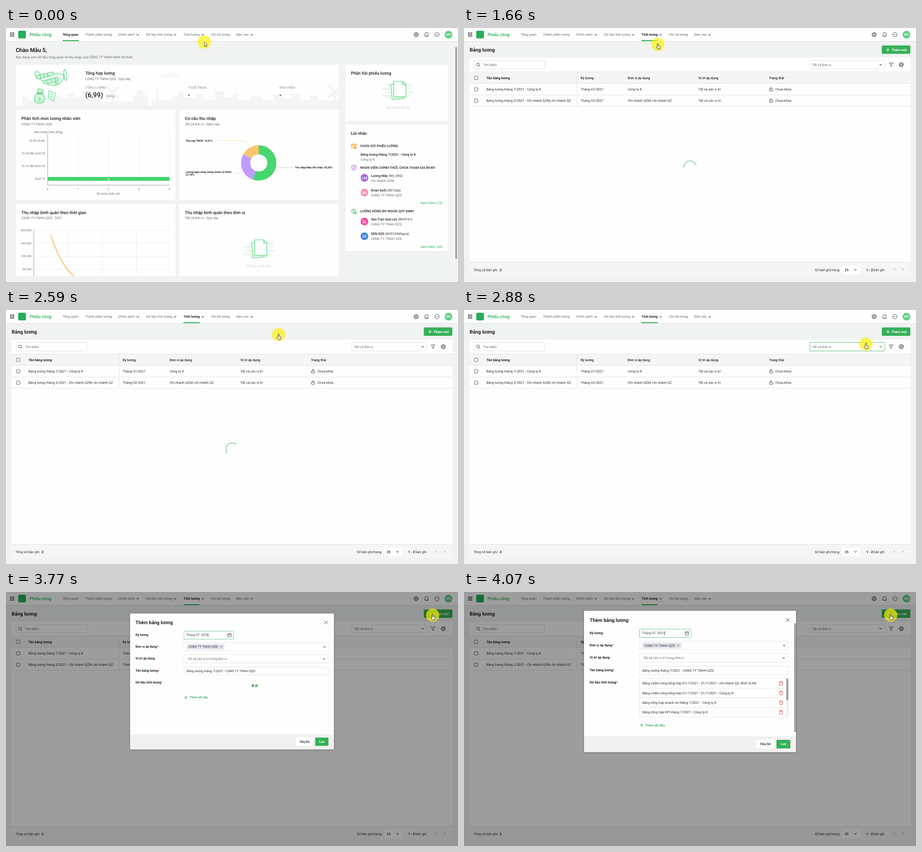
An HTML page that plays this animation: 998x561 px, repeating every 4.11 s.

```html
<!DOCTYPE html>
<html lang="vi">
<head>
<meta charset="utf-8">
<title>Bảng lương</title>
<style>
html, body { margin: 0; width: 100%; height: 100%; overflow: hidden; background: #f1f2f2; }
svg { display: block; }
text { font: 7.4px Roboto, sans-serif; fill: #2f2f2f; text-rendering: geometricPrecision; white-space: pre; }
.b { font-weight: 500; fill: #1f1f1f; }
.B { font-weight: 700; fill: #1f1f1f; }
.h { font-size: 9.42px; font-weight: 500; fill: #1f1f1f; }
.t { font-size: 10.85px; font-weight: 700; fill: #1f1f1f; }
.g { fill: #686b70; }
.l { fill: #8b8e92; }
.n { font-size: 15px; font-weight: 500; fill: #1f1f1f; }
.s { font-size: 6.4px; fill: #666; }
.d { font-size: 5.75px; font-weight: 700; fill: #1f1f1f; }
.i { font-style: italic; }
.e { text-anchor: end; }
.m { text-anchor: middle; }
.w { fill: #fff; }
.k { fill: #2fae57; font-weight: 500; }
.r { fill: #e5484d; }
.o { fill: none; stroke: #444; stroke-width: 1; }
.card { fill: #fefefe; }
.box { fill: #fefefe; stroke: #dedede; stroke-width: .8; }
.shade { filter: drop-shadow(0 1px 2px rgba(0, 0, 0, .3)); }
.grn { stroke: #3dcf6c; fill: none; stroke-width: 1.1; stroke-linejoin: round; }
.a { animation: 4110ms infinite step-end; }
.nav1 { animation-name: until1660; }
.page2 { animation-name: from1660; }
.status { animation-name: status; }
.spin { animation-name: spinShow; }
.turn { animation: turn 4110ms linear infinite; transform-origin: 499px 307px; }
.tab { animation-name: tab; }
.menu { animation: menu 4110ms linear infinite; }
.item { animation-name: item; }
.sel { animation-name: sel; }
.btn { animation-name: btn; }
.modal { animation-name: from3770; }
.grow { animation: grow 4110ms ease-out infinite; transform-origin: 499px 197.5px; }
.dots { animation-name: dots; }
.list { animation-name: list; }
.col { animation-name: col; }
.wide { animation-name: wide; width: 328.5px; }
.tip { animation-name: tip; }
.mouse { animation: mouse 4110ms linear infinite; }
.arrow { animation-name: arrow; }
.hand { animation-name: hand; }
@keyframes until1660 { 0% { opacity: 1 } 40.38% { opacity: 0 } 100% { opacity: 0 } }
@keyframes from1660 { 0% { opacity: 0 } 40.38% { opacity: 1 } }
@keyframes status { 0% { opacity: 0 } 33.32% { opacity: 1 } 40.38% { opacity: 0 } 100% { opacity: 0 } }
@keyframes spinShow { 0% { opacity: 1 } 66.66% { opacity: 0 } 100% { opacity: 0 } }
@keyframes turn { from { transform: rotate(-763.8deg) } to { transform: rotate(676.2deg) } }
@keyframes tab { 0% { fill: #686b70 } 2.6% { fill: #333 } }
@keyframes menu { 0%, 13.5% { opacity: 0 } 18%, 40.37% { opacity: 1 } 40.38%, 100% { opacity: 0 } }
@keyframes item { 0% { opacity: 0 } 25.2% { opacity: 1 } }
@keyframes sel { 0% { stroke: #dedede } 67.39% { stroke: #35b057 } 73.8% { stroke: #dedede } 100% { stroke: #dedede } }
@keyframes btn { 0% { fill: #35b057 } 76.5% { fill: #2fa551 } 82.72% { fill: #14903f } 91.72% { fill: #35b057 } }
@keyframes from3770 { 0% { opacity: 0 } 91.72% { opacity: 1 } }
@keyframes grow { 0%, 93.66% { transform: scale(.9615) } 97%, 100% { transform: none } }
@keyframes dots { 0% { opacity: 1 } 97.5% { opacity: 0 } 100% { opacity: 0 } }
@keyframes list { 0% { opacity: 0 } 97.5% { opacity: 1 } }
/* fields are wider until the dialog's scrollbar appears */
@keyframes col { 0% { transform: translateX(1px) } 97.5% { transform: none } }
@keyframes wide { 0% { width: 332px } 97.5% { width: 328.5px } }
@keyframes tip { 0% { transform: translateX(3.5px) } 97.5% { transform: none } }
@keyframes mouse {
  0% { transform: translate(438px, 31px) }
  4.38%, 20.5% { transform: translate(427px, 14.5px) }
  23.36% { transform: translate(427.5px, 22px) }
  27%, 54% { transform: translate(428px, 36px) }
  60% { transform: translate(480px, 43px) }
  66.67% { transform: translate(747px, 68px) }
  70.07% { transform: translate(887px, 75px) }
  73% { transform: translate(916px, 73px) }
  76.5% { transform: translate(935px, 58px) }
  79.08%, 100% { transform: translate(942px, 51px) }
}
@keyframes arrow { 0% { opacity: 1 } 25.2% { opacity: 0 } 100% { opacity: 0 } }
@keyframes hand { 0% { opacity: 0 } 25.2% { opacity: 1 } }
</style>
</head>
<body>
<svg width="998" height="561" viewBox="0 0 998 561">
<defs>
  <path id="chev" class="o" d="M-2.5-1.3 0 1.3 2.5-1.3" style="stroke-width:1.1"/>
  <g id="gear" class="o"><circle r="3.8"/><circle r="4.7" stroke-width="1.4" stroke-dasharray="1.8 1.89"/><circle r="1.6"/></g>
  <path id="plus" d="M-3.8 0H3.8M0-3.8V3.8" stroke-width="1.2"/>
  <rect id="check" x="-3.7" y="-3.7" width="7.4" height="7.4" rx="1" fill="#fefefe" stroke="#56566e"/>
  <g id="lock" class="o"><rect x="-3.5" y="-1" width="7" height="4.5" rx=".6"/><path d="M-1.8-1V-2.4A1.8 1.8 0 0 1 1.8-2.4"/></g>
  <g id="trash" fill="none" stroke="#ee4b4b"><path d="M-4-2.6H4M-1.4-2.8V-4H1.4V-2.8M-3-2.4V4H3V-2.4"/></g>
  <path id="mail" d="M2 3.5H-5V-4H5V0M-5-3.5 0 0 5-3.5" fill="none" stroke="#f6a01a" stroke-width="1.1"/>
  <g id="empty">
    <path d="M534 476H588M526 484H586M532 492H591M526 500H584M540 506H578" stroke="#eaf8ef" stroke-width="5" stroke-linecap="round"/>
    <path class="grn" style="fill:#f1fbf4" d="M542 475 549 473.500 552 502 571 502 571 505 546 508Z"/>
    <path class="grn" style="fill:#fefefe" d="M549 468H569L576 475V502H549ZM569 468V475H576"/>
    <text class="i m" x="558.5" y="527.5" style="fill:#d3d3d3">Không có dữ liệu</text>
  </g>
  <g id="mill" stroke="#f1f5f2" stroke-width="5"><path d="M-14-14 14 14M14-14-14 14"/><path d="M0 0V32" stroke-width="7"/></g>
</defs>

<rect width="998" height="561" fill="#f1f2f2"/>

<!-- dashboard -->
<g class="card">
  <rect x="22" y="81" width="713" height="91"/>
  <rect x="22" y="180.500" width="352.500" height="199"/>
  <rect x="382.500" y="180.500" width="352.500" height="199"/>
  <rect x="22" y="388" width="352.500" height="160"/>
  <rect x="382.500" y="388" width="352.500" height="160"/>
  <rect x="749.500" y="81" width="226.500" height="124"/>
  <rect x="749.500" y="213" width="226.500" height="279"/>
</g>
<rect x="992" y="42" width="4" height="468.500" rx="2" fill="#a2a2a2"/>
<text x="21.500" y="53" class="B" style="font-size:12.3px">Chào Mẫu 5,</text>
<text x="21.500" y="67.200" class="g">Bạn đang xem dữ liệu tổng quan về thu nhập của CÔNG TY TNHH MAY SU KHE.</text>

<path fill="#f3f6f4" d="M36 172V152H48V160H62V148H120V156H136V144H150V152H166V140H178V158H196V150H212V162H280Q281 146 297 136Q313 146 315 172H322V158H330L334 120 338 158H368V150H380V140H392V154H420V146H436V158H462V140H482V154H500V146H512V160H538V152H566V158H590V148H612V156H632V146H650V160H672V150H690V160H735V172Z"/>
<path fill="#f6f8f7" d="M334 110Q340 102 350 104 358 94 370 99 380 100 382 107L387 110Z"/>
<use href="#mill" x="236" y="143"/>
<svg x="22" y="81" width="713" height="91"><use href="#mill" x="704" y="59"/></svg>
<g class="grn">
  <path fill="#eafaef" d="M64 97C62 104 66 109 73 112 87 121 98 130 109 127 119 124 127 116 128 105 121 99 110 99 99 103L80 107 71 96Z"/>
  <path fill="#d3f4de" d="M68 105 102 97Q107 100 104 104L71 113Q65 110 68 105ZM82 117 112 109Q119 112 115 116L90 124Q82 123 82 117Z"/>
  <path d="M75 104 77 111M83 102 85 109M91 100 93 107M89 116 92 122M98 113 101 119M107 111 109 117"/>
  <ellipse cx="131" cy="104" rx="3" ry="12" fill="#fefefe" transform="rotate(-8 131 104)"/>
  <path d="M107 118 112 125"/><circle cx="112" cy="123" r="4" fill="#fefefe"/><circle cx="112" cy="123" r="1.300"/>
  <path fill="#d3f4de" d="M71 134 82 137 80 145H70Z"/>
  <path fill="#d3f4de" d="M69 143H80Q86 151 85 160 83 166 74 166 65 166 63 160 62 151 69 143Z"/>
  <path d="M68 145H81" stroke-width="2"/>
  <path fill="#fefefe" d="M95 139 109 144 105 162 93 153Z"/><path d="M97 145 105 148M96 150 104 153"/>
</g>
<text x="74" y="160.500" class="m" style="font-size:10px;fill:#3dcf6c">$</text>
<text x="175" y="103" class="h">Tổng hợp lương</text>
<text x="175" y="115" class="g">CôNG TY TNHH QZD - Quý này</text>
<text x="175" y="134.200" class="l">TỔNG LƯƠNG</text>
<text x="402" y="134.200" class="l">THUẾ TNCN</text>
<text x="604" y="134.200" class="l">BẢO HIỂM</text>
<text x="175" y="153.300" class="n">(6,99)</text>
<text x="222" y="153.300" class="l">Đồng</text>
<text x="401.500" y="153.300" class="n">-</text>
<text x="603.500" y="153.300" class="n">-</text>

<text x="34" y="202.500" class="h">Phân tích mức lương nhân viên</text>
<text x="34" y="214.700" class="g">CôNG TY TNHH QZD</text>
<text x="62" y="232.300" class="s i">Mức lương (triệu đồng)</text>
<path d="M159.500 235V347M226.500 235V347M294.500 235V347M361 235V347" stroke="#ececec"/>
<path d="M92 235V347H361" fill="none" stroke="#9a9a9a"/>
<text x="86" y="250.800" class="s e">Từ 30 trở lên</text>
<text x="86" y="279.200" class="s e">Từ 20 đến dưới 30</text>
<text x="86" y="307.200" class="s e">Từ 10 đến dưới 20</text>
<text x="86" y="335.200" class="s e">Dưới 10</text>
<text x="91.500" y="357.800" class="s m">0</text>
<text x="159" y="357.800" class="s m">1</text>
<text x="226" y="357.800" class="s m">2</text>
<text x="293.500" y="357.800" class="s m">3</text>
<text x="361" y="357.800" class="s m">4</text>
<text x="226" y="368.300" class="s m i">Số lượng nhân viên</text>
<rect x="92" y="329" width="269" height="8.500" fill="#45d56d"/>
<text x="226" y="335.700" class="B w m" style="font-size:6.4px">4</text>

<text x="395" y="202.500" class="h">Cơ cấu thu nhập</text>
<text x="395" y="214.700" class="g">Tất cả đơn vị - Năm nay</text>
<g fill="none" stroke-width="20" transform="rotate(-90 558 298)">
  <circle cx="558" cy="298" r="29" pathLength="100" stroke="#48d66f" stroke-dasharray="55.56 100"/>
  <circle cx="558" cy="298" r="29" pathLength="100" stroke="#c09bfc" stroke-dasharray="27.78 100" stroke-dashoffset="-55.56"/>
  <circle cx="558" cy="298" r="29" pathLength="100" stroke="#fcc56f" stroke-dasharray="16.66 100" stroke-dashoffset="-83.34"/>
</g>
<g fill="none" stroke-width=".8">
  <path d="M462 248.500H530L538 264" stroke="#fbdba5"/>
  <path d="M506 320.500H518L523 314" stroke="#d6c0fb"/>
  <path d="M597 305 608 308.500H633" stroke="#93e3aa"/>
</g>
<text x="397" y="250.500" class="d">Phụ cấp TNCN: 16,67%</text>
<text x="638" y="310.200" class="d">Thu nhập Mẫu Ghi chép: 55,56%</text>
<text x="397" y="319.600" class="d">Lương ngày công (công chuẩn cố định):</text>
<text x="397" y="325.500" class="d">27,78%</text>

<text x="34" y="410.500" class="h">Thu nhập bình quân theo thời gian</text>
<text x="34" y="422.200" class="g">CôNG TY TNHH QZD - 2021</text>
<path d="M62 446.500H361M62 475.500H361M62 504H361M62 532.500H361M137 446V548M212.500 446V548M288 446V548" stroke="#eee"/>
<path d="M61.500 446V548" stroke="#9a9a9a"/>
<text x="56" y="448.600" class="s e">200.000</text>
<text x="56" y="477.600" class="s e">150.000</text>
<text x="56" y="506.200" class="s e">100.000</text>
<text x="56" y="535" class="s e">50.000</text>
<path d="M99 457.500C110 492 127 529 150 548" fill="none" stroke="#f9a01f" stroke-width="1.300"/>

<text x="395" y="410.500" class="h">Thu nhập bình quân theo đơn vị</text>
<text x="395" y="422.200" class="g">Tất cả đơn vị - Quý này</text>
<use href="#empty"/>

<text x="761.500" y="103" class="h">Phản hồi phiếu lương</text>
<use href="#empty" x="307" y="-350"/>

<text x="761.500" y="236" class="h">Lời nhắc</text>
<circle cx="768" cy="260.500" r="7.500" fill="#fff5e3"/>
<use href="#mail" x="768" y="260.500"/><path d="M771 260 774.500 266H767.500Z" fill="#f6a01a"/>
<text x="782" y="262.800" class="b">CHƯA GỬI PHIẾU LƯƠNG</text>
<text x="783" y="282.200" class="b">Bảng lương tháng 7/2021 - Công ty K</text>
<text x="783" y="293.200" class="g">Công ty K</text>
<circle cx="768" cy="308.500" r="7.500" fill="#f5ecfc"/>
<path d="M768 303 772.500 304.500V308Q772.500 312 768 314 763.500 312 763.500 308V304.500ZM768 306V309.500M768 310.500V311.500" fill="none" stroke="#a35fdc"/>
<text x="782" y="310.800" class="b">NHÂN VIÊN CHÍNH THỨC CHƯA THAM GIA BHXH</text>
<circle cx="791.500" cy="331" r="8.500" fill="#a864e0"/>
<text x="791.500" y="334" class="b w m" style="font-size:8px">LM</text>
<text x="806" y="329"><tspan class="b">Lương Mây</tspan> (NV_092)</text>
<text x="806" y="340" class="g">Chi nhánh QZM</text>
<circle cx="791.500" cy="363.500" r="8.500" fill="#fc8fae"/>
<text x="791.500" y="366.500" class="b w m" style="font-size:8px">ĐS</text>
<text x="806" y="361"><tspan class="b">Đoàn Suối</tspan> (0013aa)</text>
<text x="806" y="372" class="g">CôNG TY TNHH QZD</text>
<text x="964" y="389" class="e" style="fill:#2fae57">Xem thêm (16)</text>
<circle cx="768" cy="405" r="7.500" fill="#e9f9ee"/>
<circle cx="767.500" cy="404.500" r="4.500" fill="none" stroke="#38b65d"/>
<text x="767.500" y="407" class="m" style="font-size:7px;fill:#38b65d">$</text>
<circle cx="771.500" cy="408.500" r="2" fill="#38b65d"/>
<text x="782" y="407" class="b">LƯƠNG ĐÓNG BH NGOÀI QUY ĐỊNH</text>
<circle cx="791.500" cy="427.500" r="8.500" fill="#ee509f"/>
<text x="791.500" y="430.500" class="b w m" style="font-size:8px">SL</text>
<text x="806" y="425"><tspan class="b">Sen Trao Quà Lộc</tspan> (NV0161)</text>
<text x="806" y="436" class="g">CôNG TY TNHH QZD</text>
<circle cx="791.500" cy="460" r="8.500" fill="#3f86de"/>
<text x="791.500" y="463" class="b w m" style="font-size:8px">SS</text>
<text x="806" y="457"><tspan class="b">SEN SSS</tspan> (NV015545qưe)</text>
<text x="806" y="468" class="g">CôNG TY TNHH QZD</text>
<text x="964" y="485.500" class="e" style="fill:#2fae57">Xem thêm (49)</text>
<rect class="a status" y="549" width="332" height="12" fill="#dfe2e6"/>

<!-- payroll table -->
<g class="a page2">
  <rect width="998" height="561" fill="#f1f2f2"/>
  <text x="12.500" y="51.800" class="t">Bảng lương</text>
  <rect class="a btn" x="922.500" y="38.500" width="63" height="18.500" rx="2" fill="#35b057"/>
  <use href="#plus" x="936" y="48" stroke="#fff"/>
  <text x="944" y="50.500" class="B w">Thêm mới</text>
  <rect class="card" x="12" y="65.500" width="974" height="482"/>
  <path d="M12 97H986V122.500H12ZM12 517.500H986V547.500H12Z" fill="#f5f5f5"/>
  <path d="M12 97H986M12 122.500H986M12 148H986M12 173H986M12 517.500H986M249.500 97V173" stroke="#e2e2e2"/>
  <rect class="box" x="23" y="71.500" width="155.500" height="19" rx="1.500"/>
  <circle class="o" cx="31" cy="80.500" r="3.200"/><path class="o" d="M33.300 82.800 36 85.500"/>
  <text x="42" y="83.700" class="g">Tìm kiếm</text>
  <rect class="box a sel" x="763.500" y="71.500" width="165.500" height="19" rx="1.500"/>
  <text x="768.500" y="83.500" class="g">Tất cả đơn vị</text>
  <use href="#chev" x="920" y="81"/>
  <path class="o" d="M939 77.200H947L944 81.500V85L942 84V81.500Z"/>
  <use href="#gear" x="965.500" y="81"/>
  <use href="#check" x="27" y="110"/><use href="#check" x="27" y="135.500"/><use href="#check" x="27" y="160.500"/>
  <text x="49.500" y="112.500" class="B">Tên bảng lương</text>
  <text x="257.500" y="112.500" class="b">Kỳ lương</text>
  <text x="361.500" y="112.500" class="b">Đơn vị áp dụng</text>
  <text x="517.500" y="112.500" class="b">Vị trí áp dụng</text>
  <text x="673.500" y="112.500" class="b">Trạng thái</text>
  <text x="49.500" y="137.800">Bảng lương tháng 7/2021 - Công ty K</text>
  <text x="257.500" y="137.800">Tháng 07/2021</text>
  <text x="361.500" y="137.800">Công ty K</text>
  <text x="517.500" y="137.800">Tất cả các vị trí</text>
  <use href="#lock" x="678" y="135.500"/>
  <text x="687.500" y="137.800">Chưa khóa</text>
  <text x="49.500" y="162.800">Bảng lương tháng 2/2021 - Chi nhánh QZM; chi nhánh QZ</text>
  <text x="257.500" y="162.800">Tháng 02/2021</text>
  <text x="361.500" y="162.800">Chi nhánh QZM; chi nhánh QZ</text>
  <text x="517.500" y="162.800">Tất cả các vị trí</text>
  <use href="#lock" x="678" y="160.500"/>
  <text x="687.500" y="162.800">Chưa khóa</text>
  <text x="21" y="536.500">Tổng số bản ghi:</text>
  <text x="78.700" y="536.500" class="B">2</text>
  <text x="774.500" y="536.500">Số bản ghi/trang</text>
  <rect class="card" x="834.500" y="525" width="41" height="18.500"/>
  <text x="840.500" y="536.500" class="b">25</text>
  <use href="#chev" x="864.500" y="534"/>
  <text x="888" y="536.500" class="B">1 - 2</text>
  <text x="904.300" y="536.500">bản ghi</text>
  <path d="M951.500 530.500 949 533 951.500 535.500M967.500 530.500 970 533 967.500 535.500" fill="none" stroke="#999"/>
  <g class="a spin"><path class="turn" d="M485.300 309.500A14 14 0 0 0 512.900 305.800" fill="none" stroke="#8fd4a6" stroke-width="1.900"/></g>
</g>

<!-- top bar -->
<rect width="998" height="29" fill="#fefefe"/>
<path d="M0 29.500H998" stroke="#dcdddd"/>
<path d="M9.200 11.200H18M9.200 14.600H18M9.200 18H18" stroke="#333" stroke-width="2.200" stroke-dasharray="2.200 1.100"/>
<rect x="27" y="6" width="17" height="17" rx="3" fill="#27ae5a"/>
<text x="52" y="18" class="k" style="font-size:9.7px">Phiếu công</text>
<text x="174.500" y="17.200" class="g">Thành phần lương</text>
<text x="247.500" y="17.200" class="g">Chính sách</text>
<text x="309.500" y="17.200" class="g">Dữ liệu tính lương</text>
<text x="452.800" y="17.200" class="g">Chi trả lương</text>
<text x="508.700" y="17.200" class="g">Báo cáo</text>
<use href="#chev" x="290.800" y="15"/><use href="#chev" x="373.200" y="15"/><use href="#chev" x="434.300" y="15"/><use href="#chev" x="542.300" y="15"/>
<g class="a nav1">
  <text x="125" y="17.200" class="B">Tổng quan</text>
  <rect x="125" y="27" width="35.500" height="2" fill="#2fae57"/>
  <text x="392" y="17.200" class="a tab">Tính lương</text>
</g>
<g class="a page2">
  <text x="125" y="17.200" class="g">Tổng quan</text>
  <text x="392" y="17.200" class="B">Tính lương</text>
  <rect x="392" y="27" width="35.500" height="2" fill="#2fae57"/>
</g>
<use href="#gear" x="905.500" y="14.700"/>
<path class="o" d="M924 17.800H933L932 16.500V13.500Q932 10 928.500 10 925 10 925 13.500V16.500ZM927 19.300H930"/>
<circle class="o" cx="951.500" cy="14.700" r="4.800"/>
<path d="M948.700 14.700H955" stroke="#444" stroke-width="1.200" stroke-dasharray="1.200 1.100"/>
<circle cx="977" cy="14.700" r="8.500" fill="#5ad182"/>
<text x="977" y="17.400" class="b w m">M5</text>

<g class="menu">
  <rect x="390.500" y="22.500" width="84" height="105.500" rx="2" fill="#000" opacity=".05"/>
  <rect x="391.500" y="23" width="82.500" height="104" rx="2" fill="#fefefe"/>
  <rect class="a item" x="391.500" y="27" width="82.500" height="19" fill="#e9f6ed"/>
  <text x="399.500" y="38.600">Bảng lương</text>
  <text x="399.500" y="57.800">Tạm ứng</text>
  <text x="399.500" y="77">Tổng hợp lương</text>
  <text x="399.500" y="96.200">Bảng thuế</text>
  <text x="399.500" y="115.500">Quyết toán thuế</text>
</g>

<!-- dialog -->
<g class="a modal">
  <rect width="998" height="561" opacity=".38"/>
  <g class="grow">
    <rect class="card shade" x="265" y="41.500" width="468" height="312" rx="2"/>
    <path d="M265 318.500H733V351.500Q733 353.500 731 353.500H267Q265 353.500 265 351.500Z" fill="#f1f1f1"/>
    <text x="277.500" y="65.800" class="t">Thêm bảng lương</text>
    <path class="o" d="M711 58 719 66M719 58 711 66"/>
    <text x="277.500" y="93.200" class="B">Kỳ lương</text>
    <text x="277.500" y="120.200" class="B">Đơn vị áp dụng<tspan class="r">*</tspan></text>
    <text x="277.500" y="147.200" class="B">Vị trí áp dụng</text>
    <text x="277.500" y="175.200" class="B">Tên bảng lương<tspan class="r">*</tspan></text>
    <text x="277.500" y="202.200" class="B">Dữ liệu tính lương<tspan class="r">*</tspan></text>
    <g class="a col">
      <rect class="box" x="387.500" y="82" width="114" height="18.500" rx="1" style="stroke:#4fba70"/>
      <text x="392.500" y="93.300" style="fill:#4a4a4a">Tháng 07, 2021</text>
      <path class="o" d="M443 86.500V95.500M488.500 88H496V95H488.500ZM488.500 90.500H496M490.300 86.500V88M494.200 86.500V88" style="stroke-width:.9"/>
      <rect class="box a wide" x="387.500" y="108.500" height="18.500" rx="1"/>
      <rect x="394" y="111.500" width="86.500" height="13" rx="1.500" fill="#e4e6ed"/>
      <text x="398" y="120.500">CôNG TY TNHH QZD</text>
      <path d="M471.600 116 475.400 119.800M475.400 116 471.600 119.800" stroke="#555" stroke-width=".9"/>
      <rect class="box a wide" x="387.500" y="136" height="19" rx="1"/>
      <text x="395.500" y="148.200" class="g">Tất cả các vị trí trong đơn vị</text>
      <rect class="box a wide" x="387.500" y="164" height="18.500" rx="1"/>
      <text x="394" y="175.700">Bảng lương tháng 7/2021 - CôNG TY TNHH QZD</text>
      <g class="a tip"><use href="#chev" x="707" y="118"/><use href="#chev" x="706" y="145.500"/></g>
    </g>
    <g class="a dots">
      <path d="M547 207.400H562.600" stroke="#35b057" stroke-width="5.600" stroke-linecap="round" stroke-dasharray="0 7.800"/>
      <use href="#plus" x="393" y="234.400" stroke="#2fae57"/>
      <text x="401.200" y="237" class="k">Thêm dữ liệu</text>
    </g>
    <g class="a list">
      <rect class="box" x="387.500" y="191" width="328.500" height="85"/>
      <path d="M387.500 212.500H712M387.500 233.500H712M387.500 254.800H712" stroke="#dedede" stroke-width=".8"/>
      <text x="394" y="204.400">Bảng chấm công tổng hợp 01/7/2021 - 31/7/2021 - chi nhánh QZ; Khối VLKN</text>
      <text x="394" y="225.600">Bảng chấm công tổng hợp 01/7/2021 - 31/7/2021 - Công ty K</text>
      <text x="394" y="246.800">Bảng tổng hợp doanh số tháng 7/2021 - Công ty K</text>
      <text x="394" y="268">Bảng tổng hợp KPI tháng 7/2021 - Công ty K</text>
      <use href="#trash" x="700" y="202"/><use href="#trash" x="700" y="223.200"/><use href="#trash" x="700" y="244.400"/><use href="#trash" x="700" y="265.600"/>
      <rect x="711.500" y="191" width="4.500" height="85" fill="#efefef"/>
      <rect x="711.500" y="191" width="4.500" height="48.500" rx="2" fill="#a0a0a0"/>
      <rect x="729" y="69" width="4" height="240.500" rx="2" fill="#a0a0a0"/>
      <use href="#plus" x="392" y="294" stroke="#2fae57"/>
      <text x="400" y="296.700" class="k">Thêm dữ liệu</text>
    </g>
    <rect class="card" x="645.500" y="326.500" width="40.500" height="19" rx="1.500"/>
    <text x="665.700" y="338.400" class="b m">Hủy bỏ</text>
    <rect x="690" y="326.500" width="30.500" height="19" rx="1.500" fill="#35b057"/>
    <text x="705.200" y="338.400" class="B w m">Lưu</text>
  </g>
</g>

<g class="mouse">
  <circle r="14.600" fill="#fdf000" opacity=".68"/>
  <path class="a arrow" d="M0 0V9.500L2.200 7.500 3.800 11 5.200 10.300 3.700 7H6.600Z" fill="#fff" stroke="#222" stroke-width=".8"/>
  <path class="a hand" d="M-1.100-1Q0-2.200 1.100-1V3L4.600 4Q5.500 4.400 5.200 6L4.400 10.500H-.600L-3.400 6.200Q-3.300 4.600-1.100 6Z" fill="#fff" stroke="#222" stroke-width=".9"/>
</g>
</svg>
</body>
</html>
```
